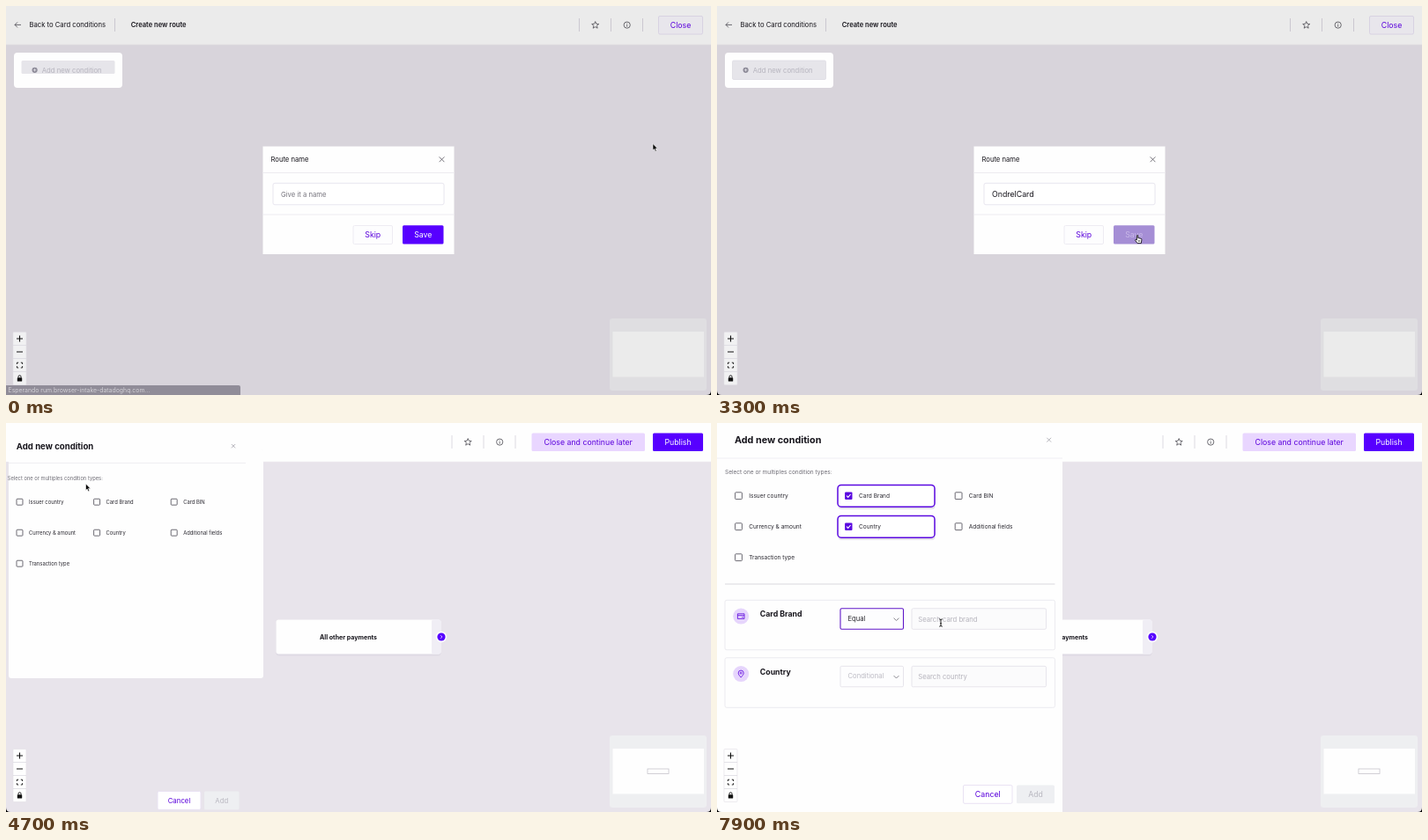
These frames come from a looping animation (800 px wide and 442 px high, 8000 ms). An HTML page:

```html
<!DOCTYPE html>
<html lang="en">
<head>
<meta charset="utf-8">
<title>Create new route</title>
<style>
html, body { margin: 0; width: 100%; height: 100%; overflow: hidden; background: #e8e4eb; }
svg { display: block; width: 100%; height: 100%; font-family: Inter, Roboto, sans-serif; }
text { white-space: pre; }
</style>
</head>
<body>
<svg id="stage" viewBox="0 0 800 442"></svg>
<script>
const LOOP = 8000, STEP = 100;
const PURPLE = '#5700ff', LINK = '#5a00dc', INK = '#17151c', PALE = '#e9d6ff', WHITE = '#fefefe';
const ROUTE = 'OndrelCard';
const stage = document.getElementById('stage');
const pen = document.createElement('canvas').getContext('2d');

const lerp = (a, b, k) => a + (b - a) * k;
const clamp = v => Math.max(0, Math.min(1, v));
const within = (t, a, b) => t >= a && t < b;

const rect = (x, y, w, h, fill, r = 0, extra = '') =>
  `<rect x="${x}" y="${y}" width="${w}" height="${h}" rx="${r}" fill="${fill}" ${extra}/>`;
const line = (d, color, w = 1, extra = '') =>
  `<path d="${d}" fill="none" stroke="${color}" stroke-width="${w}" ${extra}/>`;
const circle = (x, y, r, fill, extra = '') => `<circle cx="${x}" cy="${y}" r="${r}" fill="${fill}" ${extra}/>`;
const border = (color, w = 1) => `stroke="${color}" stroke-width="${w}"`;
const group = (x, y, body) => `<g transform="translate(${x} ${y})">${body}</g>`;

// y is the middle of the capital letters
const label = (x, y, size, str, fill = INK, weight = 400, anchor = 'start') =>
  `<text x="${x}" y="${y + size * 0.364}" font-size="${size}" fill="${fill}" font-weight="${weight}" text-anchor="${anchor}">${str}</text>`;

const button = (x, y, w, h, str, fill, color, stroke = 'none', size = 8.75) =>
  rect(x, y, w, h, fill, 1.5, border(stroke)) + label(x + w / 2, y + h / 2, size, str, color, 400, 'middle');

const cross = (x, y, r, color) =>
  group(x, y, line(`M${-r} ${-r}L${r} ${r}M${r} ${-r}L${-r} ${r}`, color, 0.8));

const star = () => {
  let d = '';
  for (let i = 0; i < 10; i++) {
    const a = Math.PI * (i / 5 - 0.5), r = i % 2 ? 1.9 : 4.2;
    d += `${i ? 'L' : 'M'}${(r * Math.cos(a)).toFixed(2)} ${(r * Math.sin(a)).toFixed(2)}`;
  }
  return line(d + 'Z', '#4a4850', 0.8, 'stroke-linejoin="round"');
};

function header(dim) {
  const shift = dim ? 0 : -144.5;
  const rule = x => line(`M${x} 14V29`, dim ? '#cbc8d0' : '#dcdae2');
  let s = rect(0, 0, 800, 44, dim ? '#ebebeb' : WHITE) + line('M0 44H800', dim ? '#dedce0' : '#f0eef2', 0.6);
  s += line('M17 21.4H10M13 18.4L10 21.4L13 24.4', '#4a4850', 0.8);
  s += label(26.4, 21.5, 7.7, 'Back to Card conditions') + rule(123.5);
  s += [650.5, 686.5, 722.5].map(x => rule(x + shift)).join('');
  s += group(668.7 + shift, 21.8, star());
  s += group(704.7 + shift, 21.6, circle(0, 0, 3.6, 'none', border('#4a4850', 0.8)) +
    line('M0 -.4V2M0 -2V-1.2', '#4a4850', 0.8));
  if (dim) {
    s += label(141.7, 21.5, 7.6, 'Create new route', INK, 600);
    s += button(740.5, 11.5, 50, 20.5, 'Close', '#e8e6ec', LINK, '#d8d2e2');
  } else {
    s += label(137, 21.5, 7.65, 'Route name:') + label(187.6, 21.5, 7.6, ROUTE, INK, 700);
    s += button(596.5, 11.5, 128.5, 20.5, 'Close and continue later', PALE, LINK);
    s += button(734, 11.5, 57, 20.5, 'Publish', PURPLE, '#fff');
  }
  return s;
}

function addCard(t, dim) {
  const ink = dim ? '#b6b4be' : '#fff';
  let s = rect(9, 53, 123, 40, WHITE, 4);
  s += dim
    ? rect(17.5, 62, 106, t < 200 ? 15 : 21.5, '#e6e5ea', 1.5, t < 200 ? '' : border('#dddce4', 0.8))
    : rect(17.5, 61.5, 106, 22.5, PURPLE, 1.5);
  s += circle(32.6, 72.8, 3.1, dim ? '#8d8b98' : '#fff');
  s += line('M31 72.8H34.2M32.6 71.2V74.4', dim ? '#e6e5ea' : PURPLE, 0.8);
  return s + label(40.8, 72.8, 7.7, 'Add new condition', ink);
}

const node = () =>
  rect(306.5, 225, 187, 39.5, '#d9d4df', 3, 'opacity=".6"') +
  rect(306.5, 223.5, 187, 39, WHITE, 3) + rect(483, 223.5, 10.5, 39, '#f0eef5', 2) +
  label(388.5, 243, 7.05, 'All other payments', INK, 700, 'middle') +
  circle(494, 243, 6.2, WHITE) + circle(494, 243, 4.6, PURPLE) +
  line('M493.2 241.3L494.9 243L493.2 244.7', '#fff', 0.8);

const minimap = (dim, hasNode) =>
  rect(685, 355, 110, 82, dim ? '#dfdee1' : '#eeeff1', 3) +
  rect(688.5, 370, 103.5, 51.5, dim ? '#ebebeb' : WHITE) +
  (hasNode ? rect(728, 393, 24, 5.5, '#fff', 0, border('#c6c4cb', 0.8)) : '');

function zoomBar(dim) {
  let s = rect(8, 370.5, 15, 60, dim ? '#f1f1f2' : WHITE, 1, border('#e2e0e6', 0.6));
  s += line('M8 385.5H23M8 400.5H23M8 415.5H23', '#d9d7de', 0.7);
  s += line('M12 378H19M15.5 374.5V381.5M12 393H19', '#111', 1.1);
  s += line('M12.4 407V405.2H14.2M16.8 405.2H18.6V407M18.6 409.2V411H16.8M14.2 411H12.4V409.2', '#111', 0.9);
  s += rect(12.8, 422.3, 5.4, 4.2, '#111', 0.6);
  return s + line('M14 422.5V421.2A1.5 1.5 0 0 1 17 421.2V422.5', '#111', 0.9);
}

const statusBar = (fill, ink, alpha) =>
  `<g opacity="${alpha}">` + rect(-3, 431, 269, 14, fill, 2) +
  label(2.5, 436.6, 6.9, 'Esperando rum.browser-intake-datadoghq.com...', ink) + '</g>';

// typing: [time, letters shown]
const KEYS = [[1000, 1], [1400, 3], [1600, 4], [1800, 5], [2000, 6], [2300, 8], [2400, 9], [2600, 10]];

function dialog(t) {
  const count = KEYS.reduce((n, [at, c]) => t >= at ? c : n, 0);
  const focus = within(t, 700, 3000), busy = t >= 3200;
  const typed = ROUTE.slice(0, count);
  let s = rect(291.5, 159.5, 217, 122.5, WHITE);
  s += label(300.5, 174.3, 7.65, 'Route name') + cross(494.5, 174.3, 2.9, '#55535c');
  s += line('M291.5 189.5H508.5M291.5 237H508.5', '#ebe9ef', 0.9);
  s += rect(303, 201.3, 194, 24.5, '#fff', 2, focus ? border('#6a1fd0', 1.2) : border('#e6e4ee', 0.9));
  s += count ? label(312, 213.5, 8.8, typed) : label(312, 213.7, 7.7, 'Give it a name', '#77757e');
  if (focus) {
    pen.font = '8.8px Inter, Roboto, sans-serif';
    s += rect(312.2 + pen.measureText(typed).width, 208.5, 0.8, 10, '#222');
  }
  s += button(394, 249.5, 44.5, 21, 'Skip', '#fdfdfe', LINK, '#eeecf3');
  return s + button(450, 249.3, 46.5, 21.2, 'Save', busy ? '#a58ed5' : PURPLE, busy ? '#c9b9e8' : '#fff');
}

const CHOICES = ['Issuer country', 'Card Brand', 'Card BIN', 'Currency &amp; amount', 'Country', 'Additional fields', 'Transaction type'];

function field(y, kind, t) {
  const brand = kind === 'Card Brand';
  const focus = brand && t >= 6700, picked = brand && t >= 7500;
  let s = rect(9, y, 374.5, 56.5, 'none', 2, border('#ecebf0'));
  s += circle(27.2, y + 18.3, 9, '#e6d5fc');
  s += group(27.2, y + 18.3, brand
    ? line('M-3.8 -2.8H3.8V2.8H-3.8ZM-3.8 -.9H3.8M1 1.2H2.6', LINK, 0.8)
    : line('M0 4C-2 1.6 -3 .3 -3 -1A3 3 0 0 1 3 -1C3 .3 2 1.6 0 4Z', LINK, 0.8) + circle(0, -1, 1, 'none', border(LINK, 0.7)));
  s += label(48.8, y + 16, 8.75, kind, INK, 700);
  s += rect(140, y + 9.5, 71.5, 23.5, '#fdfdfe', 1.5, focus ? border('#5f16c8', 1.1) : border('#e5e3ea', 0.9));
  s += label(148.5, y + 20.7, 7.65, picked ? 'Equal' : 'Conditional', picked ? '#29272e' : '#bdbbc4');
  s += line(`M200.6 ${y + 20.3}l2.9 2.9l2.9 -2.9`, '#7c7a83', 0.9);
  s += rect(221, y + 9.5, 152.5, 23.5, '#fbfbfc', 1.5, border('#e5e3ea', 0.9));
  return s + label(228.3, y + 21.4, 7.7, 'Search ' + kind.toLowerCase(), '#b5b3bc');
}

const menu = () =>
  rect(140, 237, 72, 46, '#fff', 2, border('#e3e0ea', 0.9)) + rect(140.5, 240, 71, 19, '#f3ecfd') +
  label(148.5, 249.5, 7.65, 'Equal', '#29272e') + label(148.5, 270, 7.65, 'Not equal', '#29272e');

function drawer(t) {
  // k runs through 0 (half open) to 1 (settled)
  const u = (t - 4700) / 300;
  const k = u < 0 ? u : 1 - (1 - clamp(u)) ** 2;
  const at = (a, b) => lerp(a, b, k), size = at(0.89, 1), drop = 7 * (1 - k);
  const brand = t >= 5300, country = t >= 5800;
  const left = at(3, 0), right = at(292, 392), foot = at(290, 442);
  let s = rect(0, 0, right, 44, WHITE) + rect(left, 30, right - left, foot - 30, WHITE, k < 1 ? 3 : 0);
  s += label(at(11.8, 20), 19.3 + drop, 10.8 * size, 'Add new condition', INK, 700);
  s += cross(at(258, 376.7), 19.2 + drop, 2.4 * size, '#a3a1aa');
  s += line(`M${left} ${at(45.5, 40)}H${at(272, 392)}`, '#eeecf1', 0.9);
  s += label(at(1.7, 9), 55.5 + drop, 6.53 * size, 'Select one or multiples condition types:',
    within(t, 5300, 6600) ? LINK : '#6d6b74');
  CHOICES.forEach((name, i) => {
    const col = i % 3, y = 82.7 + 35 * Math.floor(i / 3) + drop;
    const x = at(15.5 + 87.6 * col, 24.5 + 124.8 * col), r = 3.9 * size;
    const on = i === 1 && brand || i === 4 && country;
    if (on) {
      s += rect(137.5, y - 9.8, 110, 25, '#cfc8da', 4, 'opacity=".55"');
      s += rect(137, y - 12.3, 110, 24.8, '#fff', 4, border('#5a08e0', 1.5));
      s += rect(x - 4.2, y - 4.2, 8.4, 8.4, '#5a08e0', 1) + line(`M${x - 2.2} ${y}l1.6 1.7l2.9 -3.4`, '#fff', 1.1);
    } else {
      s += rect(x - r, y - r, 2 * r, 2 * r, '#fff', 0.8, border('#5b5962', 0.9));
    }
    s += label(x + at(10.5, 11.7), y, 6.55 * size, name, '#2a2830');
  });
  if (brand) s += line('M9 183H383.5', '#dcdae0', 1.1) + field(201.3, 'Card Brand', t);
  if (country) s += field(266.8, 'Country', t);
  const by = 411.5 + drop;
  s += button(at(172, 279.5), by, at(49, 55.5), 20.8, 'Cancel', '#fff', LINK, '#e9e2f3', 8.8 * size);
  s += button(at(225, 340), by, at(39.5, 43), 20.8, 'Add', '#eeeff2', '#b9b8c0', 'none', 8.7 * size);
  return s + (within(t, 6900, 7500) ? menu() : '');
}

const POINTER = {
  arrow: '<path d="M0 0V7.4L1.7 5.9L2.9 8.7L4.2 8.1L3 5.4H5.3Z" fill="#000" stroke="#fff" stroke-width=".6"/>',
  hand: '<path d="M-1.6 3V-1.2Q-.9 -2.2 -.2 -1.2V1.6L3 2.2Q4 2.5 3.9 3.6L3.3 7.6H-.9L-3.4 4.3Q-3.4 3 -2.4 3.4L-1.6 4.2Z" fill="#fff" stroke="#000" stroke-width=".8"/>' +
    line('M.4 4V6M1.7 4V6', '#000', 0.5),
  beam: line('M-1.8 -4.2Q0 -4.2 0 -3Q0 -4.2 1.8 -4.2M0 -3.4V3.4M-1.8 4.2Q0 4.2 0 3Q0 4.2 1.8 4.2M-.9 .8H.9', '#111', 0.9)
};
// pointer path: [time, x, y, shape until the next stop]
const PATH = [
  [0, 734, 156.5, 'arrow'], [400, 452, 218, 'beam'], [700, 440, 222, 'beam'], [1000, 440, 222, ''],
  [2700, 440, 222, 'beam'], [2800, 448, 238, 'arrow'], [3000, 478, 262, 'hand'], [3400, 478, 262, 'arrow'],
  [3700, 169, 108.3, 'arrow'], [4000, 100, 73, 'hand'], [4400, 92, 71, 'arrow'], [4700, 90.5, 69, 'arrow'],
  [4900, 92, 70, 'arrow'], [5200, 150, 84, 'hand'], [5400, 150, 84, 'hand'], [5700, 151, 118, 'hand'],
  [5900, 152, 119, 'arrow'], [6300, 185.3, 188.3, 'arrow'], [6600, 187, 221, 'hand'], [6900, 187, 222, 'hand'],
  [7300, 188, 249, 'hand'], [7500, 188, 249, 'arrow'], [7700, 228, 234, 'beam'], [7900, 254, 227, 'beam']
];

function pointer(t) {
  const i = PATH.findLastIndex(p => t >= p[0]);
  const a = PATH[i], b = PATH[i + 1] || a;
  if (!a[3]) return '';
  const u = b === a ? 0 : (t - a[0]) / (b[0] - a[0]), k = u * u * (3 - 2 * u);
  return group(lerp(a[1], b[1], k), lerp(a[2], b[2], k), POINTER[a[3]]);
}

function draw(t) {
  const dim = t < 3400, ready = t >= 3500;
  let s = rect(0, 0, 800, 442, dim ? '#d8d4db' : '#e8e4eb');
  if (ready) s += node();
  s += header(dim) + addCard(t, dim) + minimap(dim, ready);
  if (dim) s += dialog(t);
  if (t >= 4500) s += drawer(t);
  s += zoomBar(dim);
  s += line('M0 437V442H5Q0 442 0 437ZM800 437V442H795Q800 442 800 437Z', 'none', 0, 'style="fill:#000"');
  if (t < 300) s += statusBar('#908c98', '#d3d1d7', 1 - t / 300);
  if (within(t, 3500, 4300)) s += statusBar('#5c5862', '#f4f3f6', 1);
  stage.innerHTML = s + pointer(t);
}

let last = -1;
function tick(now) {
  const t = Math.floor((now % LOOP) / STEP) * STEP;
  if (t !== last) draw(last = t);
  requestAnimationFrame(tick);
}
draw(0);
requestAnimationFrame(tick);
</script>
</body>
</html>
```
